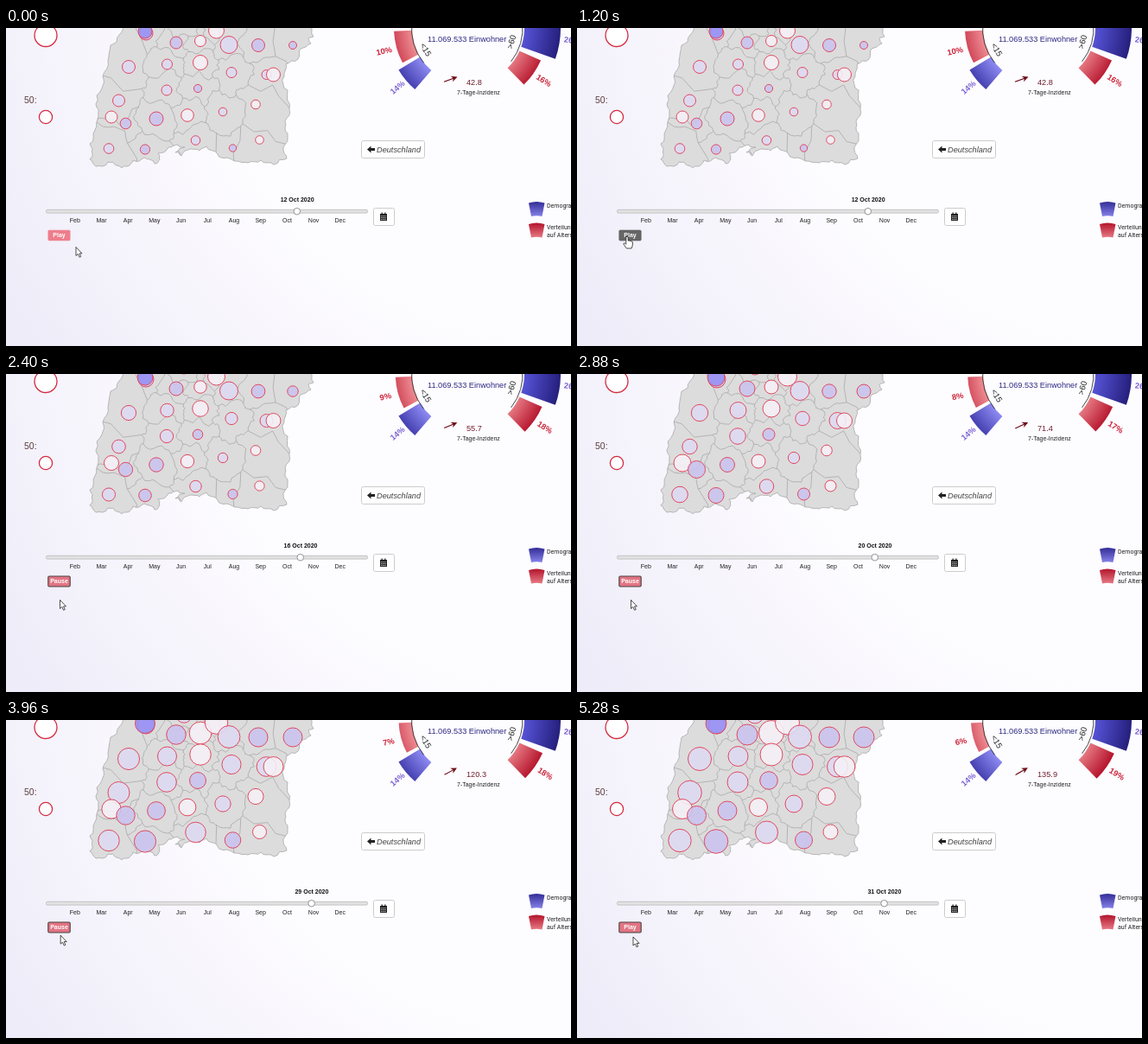
Animation of 654 by 368 pixels, one loop 5400 ms. Source, as an HTML page:

```html
<!DOCTYPE html>
<html lang="de">
<head>
<meta charset="utf-8">
<title>Inzidenzkarte</title>
<style>
html, body { margin: 0; width: 100%; height: 100%; overflow: hidden; }
body { background: radial-gradient(circle at 640px -60px, #fdfcff 0 420px, #f7f5fc 560px, #eeecf8 740px); }
svg { display: block; width: 654px; height: 368px; font-family: "Liberation Sans", Arial, sans-serif; }
.mid { text-anchor: middle; }
.bold { font-weight: bold; }
</style>
</head>
<body>
<svg id="stage" viewBox="0 0 654 368">
  <defs>
    <clipPath id="land"><path id="clip"/></clipPath>
  </defs>

  <g id="legendRings" fill="#fff" stroke="#d42a40" stroke-width="1.3">
    <circle cx="46" cy="8.5" r="13"/>
    <circle cx="46" cy="103" r="7.6"/>
  </g>
  <text x="21" y="86.5" font-size="10.5" fill="#5c3f42">50:</text>

  <g stroke="#a9a9a9" stroke-width=".8" stroke-linejoin="round">
    <path id="outline" fill="#dcdcdc"/>
    <path id="borders" fill="none" clip-path="url(#land)"/>
  </g>
  <g id="dots" stroke="#e04a60" stroke-width="1"></g>

  <g id="ring"></g>
  <g fill="none" stroke="#333" stroke-width=".9">
    <path id="arcL"/><path id="arcR"/>
  </g>
  <g class="mid" font-size="9.5" fill="#222">
    <text transform="translate(486 25) rotate(60)" dy=".35em">&lt;15</text>
    <text transform="translate(585 16) rotate(-74)" dy=".35em">&gt;60</text>
  </g>
  <text x="488" y="16" font-size="9.2" fill="#2b2880">11.069.533 Einwohner</text>
  <g id="trend" stroke="#6e0d18" fill="#6e0d18">
    <path d="M-8 0H6" stroke-width="1.1"/>
    <path d="M8.5 0L1.5 -3.4L3.5 0L1.5 3.4Z" stroke="none"/>
  </g>
  <text id="rate" x="533" y="65.5" font-size="9.2" fill="#6e1f2a"></text>
  <text x="522" y="77" font-size="7" fill="#222">7-Tage-Inzidenz</text>

  <rect x="411.5" y="130.5" width="73" height="20" rx="2" fill="#fff" stroke="#ccc"/>
  <path d="M418 140.5L422.5 136.5V139H427V142H422.5V144.5Z" fill="#222"/>
  <text x="429" y="144" font-size="9.2" font-style="italic" fill="#444">Deutschland</text>

  <rect x="46.5" y="210.3" width="372" height="3.8" rx="1.5" fill="#e2e2e2" stroke="#b9b9b9" stroke-width=".8"/>
  <circle id="knob" cy="212.2" r="3.8" fill="#fff" stroke="#888" stroke-width=".9"/>
  <text id="date" class="mid bold" y="201.3" font-size="7" fill="#111"></text>
  <g id="months" class="mid" font-size="7" fill="#222"></g>

  <rect x="425.5" y="208.5" width="24" height="20" rx="2" fill="#fff" stroke="#ccc"/>
  <path d="M433 215h8v8h-8zM434.5 213.5h1.3v2h-1.3zM438.2 213.5h1.3v2h-1.3z" fill="#222"/>
  <path d="M434 217.7h6M434 219.6h6M434 221.5h6" stroke="#fff" stroke-width=".7" stroke-dasharray="1.4 .7"/>

  <g id="legend"></g>
  <g font-family="Roboto, sans-serif" font-size="7" fill="#222">
    <text x="626" y="208">Demografie</text>
    <text x="626" y="233">Verteilung</text>
    <text x="626" y="242">auf Altersgruppen</text>
  </g>

  <rect id="button" x="48.8" y="234" width="25.4" height="12" rx="1.2"/>
  <text id="caption" class="mid bold" x="61.5" y="242.4" font-size="7" fill="#fff"></text>
  <path id="arrow" d="M0 0V10L2.3 8L4.1 11.8L5.7 11L4 7.4H7Z" fill="#fff" stroke="#222" stroke-width=".8"/>
  <path id="hand" d="M-1.2 1Q0 -.6 1.2 1V5.2Q2.4 4.4 3.2 5.6Q4.3 4.9 5 6.1Q6.2 5.7 6.4 7V10L5.2 14H-.8L-4 9.2Q-4.2 7.4 -2.6 8L-1.2 9.3Z" fill="#fff" stroke="#222" stroke-width=".8"/>
</svg>
<script>
const LOOP = 5400, STEP = 120;
const $ = id => document.getElementById(id);
const set = (el, attrs) => { for (const k in attrs) el.setAttribute(k, attrs[k]); return el; };
const add = (parent, tag, attrs, text = "") => {
  const el = set(document.createElementNS("http://www.w3.org/2000/svg", tag), attrs);
  el.textContent = text;
  return parent.appendChild(el);
};

// Rows start with a time; the remaining columns are interpolated.
function sample(rows, t) {
  const n = rows.findIndex(row => row[0] > t);
  if (n === 0) return rows[0].slice(1);
  if (n < 0) return rows[rows.length - 1].slice(1);
  const a = rows[n - 1], b = rows[n], u = (t - a[0]) / (b[0] - a[0]);
  return a.slice(1).map((v, i) => v + (b[i + 1] - v) * u);
}

/* ---------- map ---------- */
let seed = 11;
const random = () => (seed = (seed * 16807) % 2147483647) / 2147483647;

function jag(a, b, depth, rough) {
  if (!depth) return `L${b[0].toFixed(1)} ${b[1].toFixed(1)}`;
  const k = (random() - .5) * rough;
  const m = [(a[0] + b[0]) / 2 - (b[1] - a[1]) * k, (a[1] + b[1]) / 2 + (b[0] - a[0]) * k];
  return jag(a, m, depth - 1, rough) + jag(m, b, depth - 1, rough);
}

const coast = `134,-6 131,8 121,20 118,38 112,56 111,70 104,88 107,102 103,118 97,134 100,146 97,152
 104,160 118,155 128,159 140,160 147,153 160,150 172,157 178,152 176,145 188,138 199,135 207,138
 196,144 203,148 213,140 224,142 232,137 245,146 255,150 268,154 280,156 295,153 310,158 325,151
 321,138 326,122 323,108 328,94 326,72 322,56 324,42 338,36 341,24 353,18 350,12 356,10 352,-6`
  .split(/\s+/).map(p => p.split(",").map(Number));
const land = `M${coast[0]}` + coast.slice(1).map((p, i) => jag(coast[i], p, 2, .4)).join("") + "Z";
set($("outline"), { d: land });
set($("clip"), { d: land });

// x, y, radius at the start, in the middle and at the end
const cases = [
  [162, 6, 8, 10, 10], [161, 4, 8, 10, 12], [206, -6, 5, 7, 10], [197, 17, 7, 9, 12],
  [225, 15, 6.5, 8, 14.5], [225, 40, 8.5, 10, 13], [243.5, 3, 9, 11, 14], [258, 19.5, 10, 11, 13.5],
  [292, 20, 7.5, 8.2, 12], [332, 20, 4.5, 8, 12], [301.5, 54, 5.5, 9.5, 12], [309.5, 54, 8, 9, 12.3],
  [261, 51.5, 6, 8.2, 12], [222, 70, 4.6, 7, 10.3], [186.5, 42, 6, 9.5, 11.5], [186, 72, 6, 9.3, 12],
  [142, 45, 7.5, 9.7, 13.5], [130.5, 84, 7, 8.7, 13.8], [122, 103, 7, 10, 11.5], [138.5, 110.5, 6.3, 10, 11],
  [174, 105, 8, 8.5, 11], [210, 101, 7.3, 8, 10.5], [251, 97, 4.8, 6.6, 10], [289, 88.5, 5.3, 6.3, 10],
  [293.5, 129.5, 4.8, 6.5, 8.5], [262.5, 139, 4.2, 7, 10], [219.5, 130, 5.3, 8.2, 13], [161, 140.5, 5.6, 9, 13.8],
  [119, 139.5, 5.8, 9.3, 13.2]
];
const tones = ["#f5f0f6", "#ddd9f2", "#c9c3ef", "#9690f2"];
const toneOf = "23120001221012111102201002121";
const dots = cases.map(([cx, cy], i) =>
  add($("dots"), "circle", { cx, cy, fill: tones[toneOf[i]], "fill-opacity": .88 }));

// District borders: edges of the nearest-centre cells
const twins = [0, 11, 18];
const sites = cases.filter((c, i) => !twins.includes(i));
let lines = "";
sites.forEach((a, i) => sites.slice(i + 1).forEach(b => {
  const mx = (a[0] + b[0]) / 2, my = (a[1] + b[1]) / 2, dx = a[1] - b[1], dy = b[0] - a[0];
  let lo = -3, hi = 3;
  for (const c of sites) {
    if (c === a || c === b) continue;
    const ex = c[0] - a[0], ey = c[1] - a[1];
    const slope = dx * ex + dy * ey;
    const room = ((c[0] + a[0]) / 2 - mx) * ex + ((c[1] + a[1]) / 2 - my) * ey;
    if (slope > 0) hi = Math.min(hi, room / slope);
    else if (slope < 0) lo = Math.max(lo, room / slope);
    else if (room < 0) hi = lo;
  }
  if (hi <= lo) return;
  const p = [mx + dx * lo, my + dy * lo], q = [mx + dx * hi, my + dy * hi];
  lines += `M${p}` + jag(p, q, 3, .6);
}));
set($("borders"), { d: lines });

/* ---------- ring chart ---------- */
const CX = 535, CY = 0, INNER = 65;
const polar = (r, deg) => {
  const a = deg * Math.PI / 180;
  return [CX + r * Math.cos(a), CY + r * Math.sin(a)];
};
const sector = (r, from, to) =>
  `M${polar(INNER, from)}A${INNER} ${INNER} 0 0 1 ${polar(INNER, to)}` +
  `L${polar(r, to)}A${r} ${r} 0 0 0 ${polar(r, from)}Z`;
const arc = (r, from, to) => `M${polar(r, from)}A${r} ${r} 0 0 1 ${polar(r, to)}`;
set($("arcL"), { d: arc(65.5, 142, 186) });
set($("arcR"), { d: arc(63, -6, 38) });

function gradient(id, shape, stops) {
  const g = add(document.querySelector("defs"), shape.r ? "radialGradient" : "linearGradient",
    { id, gradientUnits: "userSpaceOnUse", ...shape });
  stops.forEach(([offset, color]) => add(g, "stop", { offset, "stop-color": color }));
  return `url(#${id})`;
}
const glow = (id, r, light, dark) =>
  gradient(id, { cx: CX, cy: CY, r }, [[INNER / r, light], [1, dark]]);

const wedges = [
  { from: 131, to: 149, tilt: -40, ink: "#7b62d2", fill: glow("b1", 95, "#8d8af2", "#433eae") },
  { from: 152, to: 177.5, tilt: -12, ink: "#cc2238", fill: glow("r1", 87, "#ee8d94", "#cf4556") },
  { from: 24, to: 45.5, tilt: 32, ink: "#cc2238", fill: glow("r2", 95, "#e57781", "#b5142c") },
  { from: -6, to: 19.5, tilt: 7, ink: "#7b62d2", fill: glow("b2", 107, "#5653d6", "#251f7c") }
].map(w => ({
  ...w,
  shape: add($("ring"), "path", { fill: w.fill }),
  label: add($("ring"), "text", { class: "mid bold", "font-size": 9.3, fill: w.ink, dy: ".35em" })
}));

function drawWedge(w, r, value, gap) {
  const [x, y] = polar(r + gap, (w.from + w.to) / 2);
  set(w.shape, { d: sector(r, w.from, w.to) });
  set(w.label, { transform: `translate(${x} ${y}) rotate(${w.tilt})` });
  w.label.textContent = Math.round(value) + "%";
}

[[201, "#8b88ee", "#322c96"], [225.5, "#ea808a", "#b3142c"]].forEach(([y, light, dark], i) =>
  add($("legend"), "path", {
    d: `M605 ${y + 1.5}Q614 ${y - 1.5} 623.5 ${y + 1.5}L620.5 ${y + 17}Q614 ${y + 15.5} 608 ${y + 17}Z`,
    fill: gradient("k" + i, { x1: 0, x2: 0, y1: y, y2: y + 18 }, [[0, dark], [1, light]])
  }));

/* ---------- slider ---------- */
"Feb Mar Apr May Jun Jul Aug Sep Oct Nov Dec".split(" ").forEach((m, i) =>
  add($("months"), "text", { x: 79.8 + i * 30.7, y: 224.8 }, m));

/* ---------- timeline ---------- */
// time, incidence, share under 15, share over 60
const stats = [
  [1920, 42.8, 10, 16], [2400, 55.7, 9, 17.6], [2880, 71.4, 8.2, 17.2],
  [3480, 102.5, 7.7, 17.4], [4320, 133.7, 6.2, 18.8], [4440, 135.9, 6, 19]
];
const growth = [[1920, 0], [2880, 1], [4320, 2]];
const mouse = [
  [720, 81, 253.5], [1200, 58, 241], [2280, 58, 241], [2400, 62.5, 261.5],
  [3720, 62.5, 261.5], [4080, 63.5, 243], [4680, 63.5, 243], [4800, 65, 251]
];
const within = (t, a, b) => t >= a && t < b;

function draw(t) {
  const day = Math.max(0, Math.min(19, Math.round((t - 1920) / 120)));
  const [rate, young, old] = sample(stats, t);
  const [grow] = sample(growth, t);
  const [mx, my] = sample(mouse, t);
  const hover = within(t, 1080, 2400) || within(t, 4080, 4800);
  const playing = within(t, 1800, 4440);

  cases.forEach(([, , a, b, c], i) =>
    set(dots[i], { r: grow < 1 ? a + (b - a) * grow : b + (c - b) * (grow - 1) }));

  drawWedge(wedges[0], 94, 14, 13);
  drawWedge(wedges[1], 68.5 + 1.75 * young, young, 15);
  drawWedge(wedges[2], 76 + old, old, 14.5);
  drawWedge(wedges[3], 107, 26, 14);
  $("rate").textContent = rate.toFixed(1);
  set($("trend"), { transform: `translate(514.5 59.5) rotate(${-20 - 5 * grow})` });

  const x = 336.8 + day * .99;
  set($("knob"), { cx: x });
  set($("date"), { x: x + .3 });
  $("date").textContent = `${12 + day} Oct 2020`;

  const focus = t >= 1800;
  set($("button"), {
    fill: hover ? "#666" : focus ? "#e27483" : "#ef7c8b",
    stroke: hover ? "#555" : focus ? "#444" : "#e8909c",
    "stroke-width": focus && !hover ? 1.1 : .6
  });
  $("caption").textContent = playing ? "Pause" : "Play";
  const place = `translate(${mx} ${my})`;
  set($("arrow"), { transform: place, visibility: hover ? "hidden" : "visible" });
  set($("hand"), { transform: place, visibility: hover ? "visible" : "hidden" });
}

const start = performance.now();
function tick() {
  const t = (performance.now() - start) % LOOP;
  draw(Math.floor(t / STEP) * STEP);
  requestAnimationFrame(tick);
}
tick();
</script>
</body>
</html>
```
